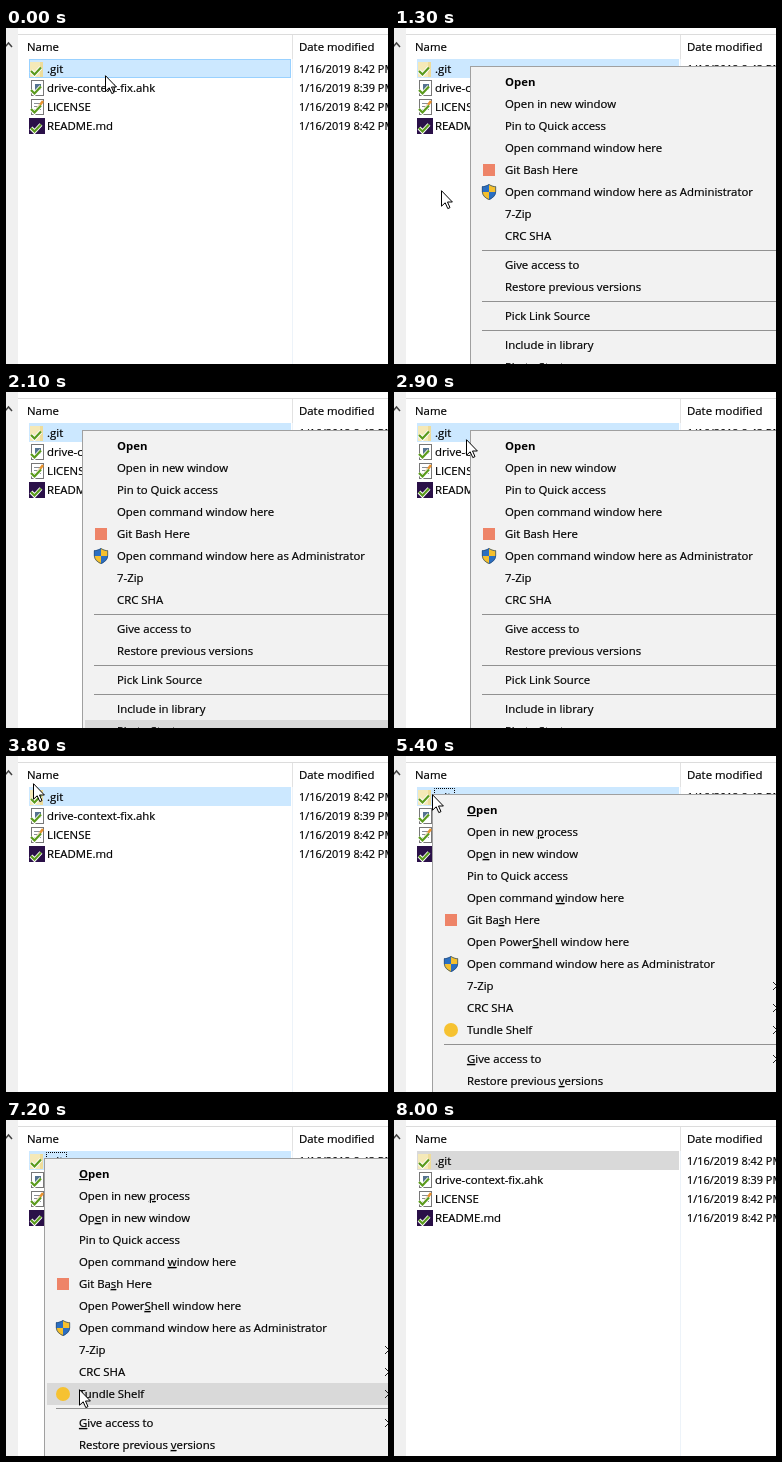
Animation, 382 px wide and 336 px high, one loop 8.1 s. Source, as an HTML page:

```html
<!DOCTYPE html>
<html lang="en">
<head>
<meta charset="utf-8">
<title>Context menu</title>
<style>
  html, body { margin: 0; width: 100%; height: 100%; overflow: hidden; background: #fff; }
  svg { display: block; }
  text {
    font: 11.38px "Open Sans", "Noto Sans", sans-serif; white-space: pre;
    stroke: #000; stroke-width: .2px;
  }
  .bold { font-weight: 700; stroke: none; }
  .date { font-size: 10.9px; }
  .key { text-decoration: underline; }
</style>
</head>
<body>
<svg id="stage" width="382" height="336" viewBox="0 0 382 336"></svg>
<script>
const LOOP = 8100, STEP = 100, ROW = 22, GAP = 7, FILE_ROW = 19;

const rect = (x, y, w, h, fill, extra = '') =>
  `<rect x="${x}" y="${y}" width="${w}" height="${h}" fill="${fill}" ${extra}/>`;
const path = (d, fill, extra = '') => `<path d="${d}" fill="${fill}" ${extra}/>`;
const line = (d, color, width = 1) => path(d, 'none', `stroke="${color}" stroke-width="${width}"`);
const at = (x, y, body) => `<g transform="translate(${x} ${y})">${body}</g>`;
// An underscore marks the letter to underline.
const label = (x, mid, str, cls = '') => `<text x="${x}" y="${mid + 4}" class="${cls}">` +
  str.replace(/_(.)/, '<tspan class="key">$1</tspan>') + '</text>';

// Icons fill a 16 by 16 box.
const tick = line('M2 10l3.5 3.5L12 6.5', '#fff', 4) + line('M2 10l3.5 3.5L12 6.5', '#5a9a1c', 2.2);
const page = rect(2.5, .5, 12, 15, '#fff', 'stroke="#777"');
const quarter = (turn, fill) => path('M8 8V0C5.5 2 3 2.2 1 2.2V8z', fill, turn);
const lower = fill => path('M8 8H1C1.5 12 4.5 14.5 8 16z', fill);
const mirror = body => `<g transform="matrix(-1 0 0 1 16 0)">${body}</g>`;
const icons = {
  folder: rect(1, 1, 13, 15, '#f5e9b8') + rect(11, 1, 3, 15, '#eedc9a') + tick,
  script: page + rect(6, 4, 6, 6, '#55738f') + tick,
  note: page + line('M5 4.5h7M5 7.5h7M5 10.5h7', '#8a8f94') +
    line('M8 10L14 2', '#e8922e', 2.5) + tick,
  readme: rect(0, 0, 16, 16, '#2a1048') + tick,
  git: rect(2, 2, 12, 12, '#ee8468'),
  shield: quarter('', '#2b6fc2') + lower('#f6c02c') +
    mirror(quarter('', '#f6c02c') + lower('#2b6fc2')) +
    line('M8 .5C5.5 2.2 3 2.7 1.3 2.7V8C1.8 12 4.5 14 8 15.5', '#2d5079', .8) +
    mirror(line('M8 .5C5.5 2.2 3 2.7 1.3 2.7V8C1.8 12 4.5 14 8 15.5', '#2d5079', .8)),
  drive: '<circle cx="8" cy="8" r="7" fill="#f6c231"/>'
};

const files = [
  ['.git', 'folder', '8:42'],
  ['drive-context-fix.ahk', 'script', '8:39'],
  ['LICENSE', 'note', '8:42'],
  ['README.md', 'readme', '8:42']
];

// Entries are [label, icon, has submenu]; null is a separator.
const plainMenu = [
  ['Open'], ['Open in new window'], ['Pin to Quick access'], ['Open command window here'],
  ['Git Bash Here', 'git'], ['Open command window here as Administrator', 'shield'],
  ['7-Zip'], ['CRC SHA'], null,
  ['Give access to'], ['Restore previous versions'], null,
  ['Pick Link Source'], null,
  ['Include in library'], ['Pin to Start']
];
const fullMenu = [
  ['_Open'], ['Open in new _process'], ['Op_en in new window'], ['Pin to Quick access'],
  ['Open command _window here'], ['Git Ba_sh Here', 'git'], ['Open Power_Shell window here'],
  ['Open command window here as Administrator', 'shield'],
  ['7-Zip', '', true], ['CRC SHA', '', true], ['Tundle Shelf', 'drive', true], null,
  ['_Give access to', '', true], ['Restore previous _versions']
];

function makeMenu(id, x, y, items, start, end) {
  const tops = [];
  let top = y + 5, body = '';
  items.forEach((item, i) => {
    if (!item) {
      body += rect(x + 12, top + 3, 400, 1, '#919191');
      top += GAP;
      return;
    }
    const [name, icon, sub] = item, mid = top + ROW / 2;
    body += label(x + 35, mid, name, i ? '' : 'bold');
    if (icon) body += at(x + 11, mid - 8, icons[icon]);
    if (sub) body += line(`M379 ${mid - 4}l4 4l-4 4`, '#222');
    tops.push(top);
    top += ROW;
  });
  const svg = `<g id="${id}">` + rect(x + .5, y + .5, 400, 400, '#f2f2f2', 'stroke="#a0a0a0"') +
    rect(x + 3, 0, 400, ROW, '#d9d9d9', `id="${id}Hover"`) + body + '</g>';
  return { id, x, tops, start, end, svg };
}

const menus = [
  makeMenu('plain', 76, 38, plainMenu, 600, 3300),
  makeMenu('full', 38, 38, fullMenu, 4900, 8000)
];

const $ = id => document.getElementById(id);

$('stage').innerHTML =
  rect(0, 0, 382, 336, '#fff') + rect(0, 0, 12, 336, '#f0f0f0') +
  line('M-1 19l3.5-4l3.5 4', '#404040', 1.5) +
  rect(12, 6, 370, 1, '#dcdcdc') +
  rect(286, 7, 1, 24, '#e2e2e2') + rect(286, 31, 1, 305, '#edf3f9') +
  label(21, 19, 'Name') + label(293, 19, 'Date modified') +
  rect(23.5, 31.5, 261, 18, '', 'id="pick"') +
  files.map(([name, icon, time], i) => {
    const mid = 41 + FILE_ROW * i;
    return at(23, mid - 8, icons[icon]) + label(41, mid, name) +
      label(293, mid, `1/16/2019 ${time} PM`, 'date');
  }).join('') +
  rect(40.5, 32.5, 20, 16, 'none',
    'id="focus" stroke="#000" stroke-dasharray="1 1" stroke-dashoffset=".5"') +
  menus.map(m => m.svg).join('') +
  path('M.5 .7V16.2L4.2 12.8L6.8 18.6L9 17.6L6.5 12H11.4z', '#fff', 'id="cursor" stroke="#000"');

// Each pointer sweep bends towards a pull point on its way to the goal.
const home = [99, 47];
const sweeps = [
  { from: 0, to: 200, goal: [76, 38] },
  { from: 1000, to: 1900, pull: [7, 261], goal: [90, 261] },
  { from: 1900, to: 2500, pull: [120, 458], goal: [62, 186] },
  { from: 2600, to: 2900, goal: [72, 47] },
  { from: 2900, to: 3500, pull: [42, 27], goal: [38, 38] },
  { from: 3700, to: 3800, goal: [27, 27] },
  { from: 4800, to: 4900, goal: [38, 38] },
  { from: 5350, to: 6300, pull: [2, 200], goal: [73, 269] },
  { from: 7200, to: 7800, pull: [48, 295], goal: [20, 345] }
];
sweeps[0].from = STEP / 2;
sweeps[7].from = 5400;

const mix = (a, b, k) => a.map((v, i) => v + (b[i] - v) * k);

function pointer(t) {
  let pos = home;
  for (const { from, to, pull, goal } of sweeps) {
    if (t < from) break;
    const k = Math.min(1, (t - from) / (to - from));
    pos = pull ? mix(mix(pos, pull, k), mix(pull, goal, k), k) : mix(pos, goal, k);
  }
  return pos.map(Math.round);
}

const set = (id, attrs) => {
  for (const name in attrs) $(id).setAttribute(name, attrs[name]);
};
const show = on => on ? 'visible' : 'hidden';

function draw(now) {
  const t = Math.floor(now % LOOP / STEP) * STEP;
  const [x, y] = pointer(t);
  set('cursor', { transform: `translate(${x} ${y})` });
  const fill = t < 8000 ? '#cce8ff' : '#d9d9d9';
  set('pick', { fill, stroke: t < 600 ? '#99d1ff' : fill });
  set('focus', { visibility: show(t >= 4900 && t < 8000) });
  for (const m of menus) {
    const open = t >= m.start && t < m.end;
    const top = m.tops.find(r => y >= r && y < r + ROW);
    const hover = open && x >= m.x + 3 && top !== undefined;
    set(m.id, { visibility: show(open), opacity: t === m.start ? .5 : 1 });
    set(m.id + 'Hover', { visibility: show(hover), y: top || 0 });
  }
  requestAnimationFrame(() => draw(performance.now()));
}
draw(performance.now());
</script>
</body>
</html>
```
